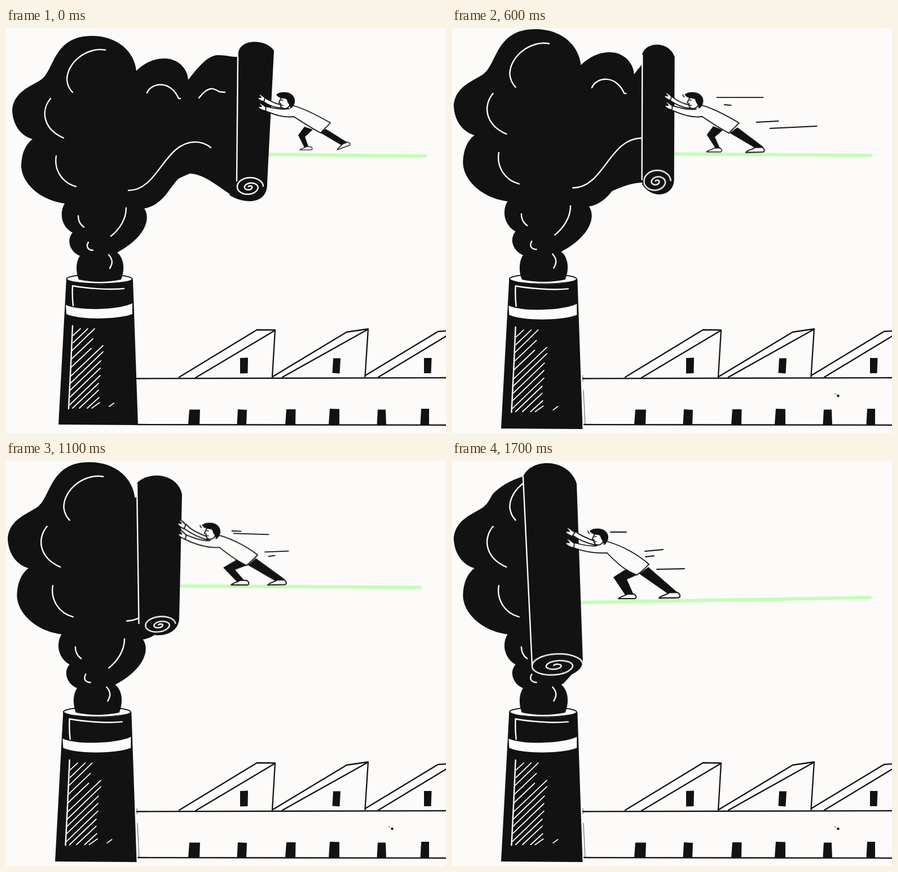
Write an HTML page without scripts that moves like this. It is 780 px wide and 718 px high and loops after 2 s.

```html
<!DOCTYPE html>
<html lang="en">
<head>
<meta charset="utf-8">
<title>Rolling up the smoke</title>
<style>
html, body { margin: 0; width: 100%; height: 100%; overflow: hidden; background: #fcfbf9; }
svg { display: block; width: 100%; height: 100%; }
.ink { fill: #121212; }
.paper { fill: #fcfbf9; }
.pen { fill: none; stroke: #121212; stroke-width: 2.3; stroke-linecap: round; stroke-linejoin: round; }
.chalk { fill: none; stroke: #fcfbf9; stroke-width: 2.4; stroke-linecap: round; stroke-linejoin: round; }
.skin { fill: #fcfbf9; stroke: #121212; stroke-width: 1.8; stroke-linecap: round; stroke-linejoin: round; }

/* Drawn on 100 ms ticks: 300 ms spans take three steps, 200 ms spans two. */
.move { animation: 2s steps(3) infinite; }
.late { animation: late 2s step-end infinite; }
#stack { animation: grow 2s step-end infinite; }
#cover { animation-name: cover; }
#tail { animation-name: tail; }
#ground { animation-name: ground; }
#roll { animation-name: roll; }
#edge { animation-name: edge; }
#spiral { animation-name: spiral; }
#speed { animation-name: speed; }
#man { animation-name: man; }
#coat { animation-name: coat; }
#sleeve { animation-name: sleeve; }
#handA { animation-name: handA; }
#handB { animation-name: handB; }
#legA { animation-name: legA; }
#legB { animation-name: legB; }
#shoeA { animation-name: shoeA; }
#shoeB { animation-name: shoeB; }

@keyframes late { 0% { opacity: 0 } 30%, to { opacity: 1 } }
@keyframes grow { 0% { transform: none } 30%, to { transform: matrix(1.025, 0, 0, 1.0276, -8.3, -12.4) } }

@keyframes cover {
  0% { d: path('M440,0L440,0Q440,0 440,0L440,290L440,290L440,310L500,310L500,0Z') }
  15% { animation-timing-function: steps(2); d: path('M440,0L440,0Q440,0 440,0L440,290L440,290L440,310L500,310L500,0Z') }
  25% { d: path('M370,0L370,0Q370,0 370,0L370,280L370,290L370,310L500,310L500,0Z') }
  40% { animation-timing-function: steps(2); d: path('M310,0L310,0Q310,0 310,0L310,312L310,316L310,320L500,320L500,0Z') }
  50% { animation-timing-function: steps(2); d: path('M290,0L290,0Q290,0 290,0L290,290L290,300L290,320L500,320L500,0Z') }
  60%, 75% { animation-timing-function: steps(2); d: path('M255,0L255,0Q255,0 255,0L255,300L270,305L265,318L500,320L500,0Z') }
  85%, to { d: path('M60,0L70,61Q90,38 130,26L175,340L232,357L198,394L500,394L500,0Z') }
}
@keyframes tail {
  0% { d: path('M236,200L358,200L358,250C330,250 285,280 236,300Z') }
  15% { animation-timing-function: steps(2); d: path('M236,200L358,200L358,250C330,250 285,280 236,300Z') }
  25% { d: path('M236,200L358,200L358,268C320,258 285,285 236,305Z') }
  40% { animation-timing-function: steps(2); d: path('M236,200L299,200L299,286C285,306 262,312 240,314Z') }
  50% { animation-timing-function: steps(2); d: path('M236,200L262,200L276,292C268,302 256,309 243,313Z') }
  60%, 75% { animation-timing-function: steps(2); d: path('M222,200L225,200L225,305C225,310 225,315 225,318Z') }
  85%, to { d: path('M180,200L185,200L185,305C185,310 185,315 185,318Z') }
}
@keyframes ground {
  0% { d: path('M460,224L743,227') }
  15% { animation-timing-function: steps(2); d: path('M460,224L747,226') }
  25% { d: path('M400,224L745,225') }
  40% { animation-timing-function: steps(2); d: path('M355,222L736,227') }
  50% { animation-timing-function: steps(2); d: path('M325,222L729,226') }
  60%, 75% { animation-timing-function: steps(2); d: path('M276,221L738,222') }
  85%, to { d: path('M218,251L741,242') }
}
@keyframes roll {
  0% { d: path('M409,272L412,42C418,18 462,20 475,40L463,275C464,315 420,312 396,296Z') }
  15% { animation-timing-function: steps(2); d: path('M409,268L412,42C418,18 462,20 475,40L467,258C462,316 425,310 396,296Z') }
  25% { d: path('M355,262L357,48C362,24 402,22 411,54L408,270C406,296 372,300 355,274Z') }
  40% { animation-timing-function: steps(2); d: path('M302,284L298,42C306,24 350,22 362,46L365,270C364,307 316,312 302,284Z') }
  50% { animation-timing-function: steps(2); d: path('M260,276L247,48C262,18 322,18 332,66L331,272C329,300 295,302 270,294Z') }
  60%, 75% { animation-timing-function: steps(2); d: path('M211,304L217,31C240,18 284,22 292,52L283,290C278,324 225,330 211,304Z') }
  85%, to { d: path('M141,362L126,28C140,-6 206,-6 221,40L232,355C230,388 160,392 141,362Z') }
}
@keyframes edge {
  0% { d: path('M411,50L409,271') }
  15% { animation-timing-function: steps(2); d: path('M411,50L409,264') }
  25% { d: path('M357,50L355,260') }
  40% { animation-timing-function: steps(2); d: path('M298,45L300,286') }
  50% { animation-timing-function: steps(2); d: path('M247,50L260,276') }
  60%, 75% { animation-timing-function: steps(2); d: path('M217,32L211,300') }
  85%, to { d: path('M126,28L142,362') }
}
@keyframes spiral {
  0% { transform: translate(433px, 282px) scale(23, 16) }
  15% { animation-timing-function: steps(2); transform: translate(434px, 273px) scale(22, 13) }
  25% { transform: translate(380px, 267px) scale(21, 20) }
  40% { animation-timing-function: steps(2); transform: translate(332px, 283px) scale(29, 17) }
  50% { animation-timing-function: steps(2); transform: translate(299px, 281px) scale(25, 13) }
  60%, 75% { animation-timing-function: steps(2); transform: translate(249px, 301px) rotate(-8deg) scale(28, 16) }
  85%, to { transform: translate(187px, 363px) rotate(-2deg) scale(45, 20) }
}
@keyframes speed {
  0%, 25% { d: path('M483,123L565,123M496,136L508,137M553,167L592,165M577,178L660,174') }
  40% { animation-timing-function: steps(2); d: path('M443,123.500L525,123.500M457,136L468,137M513,167L552,165M537,178L620,174') }
  50% { d: path('M429,139L508,142M422,128L443,130M491,178L500,177M482,171L529,170') }
  65%, 75% { animation-timing-function: steps(2); d: path('M353,107L381,107M358,116L363,114M415,151L430,149M413,142L444,139') }
  85%, to { d: path('M281,126L309,126M343,170L358,168M342,160L374,157M363,192L412,191') }
}
@keyframes man {
  0% { transform: translate(497px, 128px) }
  15% { animation-timing-function: steps(2); transform: translate(497px, 128px) }
  25% { transform: translate(443px, 128px) }
  40% { animation-timing-function: steps(2); transform: translate(405px, 128px) }
  50% { transform: translate(381px, 128px) }
  65%, 75% { animation-timing-function: steps(2); transform: translate(333px, 115px) }
  85%, to { transform: translate(262px, 134px) }
}
@keyframes coat {
  0%, 25% { d: path('M10,9C30,14 55,27 78,40C72,47 66,52 61,58C45,50 30,40 13,29C-5,32 -22,25 -37,19L-36,11C-22,15 -8,17 5,15') }
  40%, 50% { d: path('M14,8C36,15 62,29 79,41C73,48 66,53 60,59C44,51 28,40 13,29C-5,32 -28,25 -48,15L-46,7C-32,13 -12,19 -2,17') }
  65%, 75% { animation-timing-function: steps(2); d: path('M14,9C42,15 67,30 85,46C78,54 71,61 64,66C46,59 30,45 14,30C-8,28 -30,23 -46,16L-44,8C-30,14 -15,19 -5,17') }
  85%, to { d: path('M14,9C42,17 69,33 87,49C80,57 73,63 66,68C46,61 30,47 13,29C-8,30 -30,26 -46,20L-45,11C-30,15 -15,18 -5,16') }
}
@keyframes sleeve {
  0%, 25% { d: path('M-38,-4C-28,2 -20,6 -10,8L-9,14C-20,13 -32,9 -40,3Z') }
  40%, 50% { d: path('M-47,-12C-38,0 -22,6 -10,10L-7,16C-22,13 -38,4 -50,-4Z') }
  65%, 75% { animation-timing-function: steps(2); d: path('M-43,-11C-35,-2 -20,5 -7,10L-8,16C-22,12 -38,4 -48,-4Z') }
  85%, to { d: path('M-43,-9C-35,-2 -20,4 -9,8L-8,15C-22,12 -38,5 -48,-2Z') }
}
@keyframes handA {
  0%, 25% { transform: translate(-38px, -2px) }
  40%, 50% { transform: translate(-48px, -9px) rotate(12deg) }
  65%, 75% { animation-timing-function: steps(2); transform: translate(-46px, -8px) scale(1.15) }
  85%, to { transform: translate(-46px, -6px) scale(1.15) }
}
@keyframes handB {
  0%, 25% { transform: translate(-37px, 14px) }
  40%, 50% { transform: translate(-47px, 9px) rotate(8deg) }
  65%, 75% { animation-timing-function: steps(2); transform: translate(-45px, 11px) scale(1.15) }
  85%, to { transform: translate(-46px, 14px) scale(1.15) }
}
@keyframes legA {
  0% { d: path('M32,47L21,62L32,84L39,82L33,65L47,52Z') }
  15% { animation-timing-function: steps(2); d: path('M32,47L21,62L32,84L39,82L33,65L47,52Z') }
  25% { d: path('M33,45L22,60L38,87L45,85L36,65L51,52Z') }
  40% { animation-timing-function: steps(2); d: path('M32,48L20,64L36,85L43,83L35,66L48,55Z') }
  50% { d: path('M42,50L18,64L45,88L58,86L38,68L66,57Z') }
  65%, 75% { animation-timing-function: steps(2); d: path('M50,52L24,68L47,99L61,97L47,72L66,65Z') }
  85%, to { d: path('M46,58L24,72L46,105L60,103L48,76L66,68Z') }
}
@keyframes legB {
  0% { d: path('M59,57L70,51L110,76L103,83Z') }
  15% { animation-timing-function: steps(2); d: path('M59,57L70,51L110,76L103,83Z') }
  25% { d: path('M62,58L76,49L122,83L112,88Z') }
  40% { animation-timing-function: steps(2); d: path('M61,58L75,47L121,82L110,86Z') }
  50% { d: path('M62,58L76,46L127,82L114,87Z') }
  65%, 75% { animation-timing-function: steps(2); d: path('M67,66L82,54L135,95L119,99Z') }
  85%, to { d: path('M70,66L86,54L140,101L126,105Z') }
}
@keyframes shoeA {
  0% { transform: translate(24px, 88px) scale(.7) }
  15% { animation-timing-function: steps(2); transform: translate(24px, 88px) scale(.7) }
  25% { transform: translate(21px, 93px) scale(.88) }
  40% { animation-timing-function: steps(2); transform: translate(20px, 89px) scale(.84) }
  50% { transform: translate(33px, 92px) }
  65%, 75% { animation-timing-function: steps(2); transform: translate(36px, 104px) }
  85%, to { transform: translate(33px, 110px) }
}
@keyframes shoeB {
  0% { transform: translate(90px, 88px) rotate(-20deg) scale(.8) }
  15% { animation-timing-function: steps(2); transform: translate(90px, 88px) rotate(-20deg) scale(.8) }
  25% { transform: translate(89px, 93px) rotate(-2deg) scale(1.08) }
  40% { animation-timing-function: steps(2); transform: translate(93px, 92px) rotate(0deg) }
  50% { transform: translate(98px, 92px) rotate(-1deg) }
  65%, 75% { animation-timing-function: steps(2); transform: translate(101px, 104px) rotate(-1deg) scale(1.15) }
  85%, to { transform: translate(105px, 109px) rotate(-1deg) scale(1.18) }
}
</style>
</head>
<body>
<svg viewBox="0 0 780 718">
  <defs>
    <path id="hand" d="M3,0C-2,-4 -7,-9 -12,-10C-11,-7 -9,-5 -7,-3L-14,-3C-12,1 -6,4 -1,5"/>
    <path id="shoe" d="M0,0C5,-5 11,-4 16,-8L28,-8C33,-4 32,-1 29,0Z"/>
  </defs>
  <rect class="paper" width="780" height="718"/>

  <!-- factory -->
  <path class="pen" d="M232,621.500L780,620M234,703L780,704
    M307,619L445,535L477,535.500L472,619M336,620L477,536
    M473,618L604,539L642,533.500L636.500,618M490,619L642,534
    M637,616L766,538L784,537M660,619L784,544"/>
  <path class="ink" d="M415,585l14,-.5l-.5,27.500l-13.500,.5zM580,585.500h13l-1.500,27l-13,-1zM741,585h13.500l-1,27h-12.500z
    M325,676.500h19l-1,27h-20zM411,676l16,1l-1,27l-16.500,-1zM497,676h16.500l-.5,27.500l-18,.5zM574,675l17,.5v28h-19z
    M659,676.500h14l1,27h-16.500zM736,675h14v28.500h-15.500z"/>
  <g class="late">
    <path class="pen" stroke-opacity=".7" style="stroke-width:1" d="M232,616V626M233,642L236,702M678,648l3,1"/>
    <circle class="ink" cx="684.500" cy="652" r="2.200"/>
  </g>

  <path id="tail" class="move ink"/>
  <g id="stack">
    <ellipse class="skin" cx="165.500" cy="445" rx="58" ry="8.500"/>
    <path class="ink" d="M129,446C123,432 124,414 131,404C112,396 107,375 118,363C98,352 94,328 104,311C62,306 27,276 27,243
      C28,222 34,207 47,197C22,190 11,166 11,144C15,112 44,104 63,91C86,74 84,14 152,14C200,14 228,44 231,76
      C245,62 262,54 281,54C305,54 322,72 323,92C340,70 358,48 376,48C390,48 402,52 412,51L430,302L410,302
      C385,290 355,258 325,258C295,258 290,312 245,320C256,335 251,369 197,398C208,407 212,425 204,446Q166,454 129,446Z"/>
    <path class="ink" d="M107,444C120,457 210,458 225,445L234,704L93,703Z"/>
    <path class="paper" d="M106,491C130,502 200,500 224,488V507C200,517 130,518 107,507Z"/>
    <path class="chalk" d="M176,39C145,33 108,60 108,92C109,102 113,109 118,114M79,125C62,145 64,178 102,195
      M89,227C85,250 98,274 124,281M250,115C258,96 292,92 306,125L309,125M342,124C360,100 370,108 378,113L388,114
      M217,288C270,288 280,203 335,202C345,202 356,206 363,212M213,319C213,340 200,358 186,369
      M128,333C128,342 131,348 138,353M146,380C141,388 146,394 154,394M182,402C190,411 189,418 184,426
      M209,462C180,465 140,461 118,457Q117,475 119,492M118,528Q115,600 111,675"/>
    <path class="chalk" style="stroke-width:1.800" d="M119,545l13,-12M119,558l26,-25M117,572l40,-39M116,587l38,-36
      M115,602l36,-34M114,618l58,-55M114,630l58,-56M113,643l55,-53M113,655l54,-52M113,668l54,-52
      M118,674l46,-44M130,674l34,-32M144,674l21,-19M152,674l14,-10M183,671l8,-6"/>
  </g>

  <path id="cover" class="move paper"/>
  <path id="ground" class="move" fill="none" stroke="#c3ffb4" stroke-width="6" stroke-linecap="round"/>

  <path id="roll" class="move ink"/>
  <path id="edge" class="move chalk"/>
  <path id="spiral" class="move chalk" vector-effect="non-scaling-stroke"
    d="M1,-.1A1,1 0 0 0 -1,0A.8,.8 0 0 0 .6,0A.53,.53 0 0 0 -.45,0A.3,.3 0 0 0 .15,0A.16,.16 0 0 0 -.15,-.05"/>

  <g class="late"><path id="speed" class="move pen" style="stroke-width:1.800"/></g>

  <g id="man" class="move">
    <path id="legA" class="move ink"/>
    <path id="legB" class="move ink"/>
    <use id="shoeA" class="move skin" href="#shoe"/>
    <use id="shoeB" class="move skin" href="#shoe"/>
    <use id="handB" class="move skin" href="#hand"/>
    <use id="handA" class="move skin" href="#hand"/>
    <path id="coat" class="move skin"/>
    <path id="sleeve" class="move skin"/>
    <path class="skin" d="M-9,-5C-10,0 -14,3 -13,5L-10,6C-11,11 -9,14 -4,15C1,15 4,13 6,9L2,-5Z"/>
    <path class="ink" d="M-18,-10C-14,-14 -7,-15 0,-14C10,-13 16,-5 15,3C14,9 11,13 7,15C6,11 7,8 4,6C2,5 2,1 0,-2C-6,-4 -14,-3 -18,-10Z"/>
    <path class="pen" style="stroke-width:1.300" d="M-9,0l3,0M-9,9l3,0"/>
    <path class="pen late" style="stroke-width:1.500" d="M-21,-10Q-21,-7 -18.500,-5.500"/>
  </g>
</svg>
</body>
</html>
```
